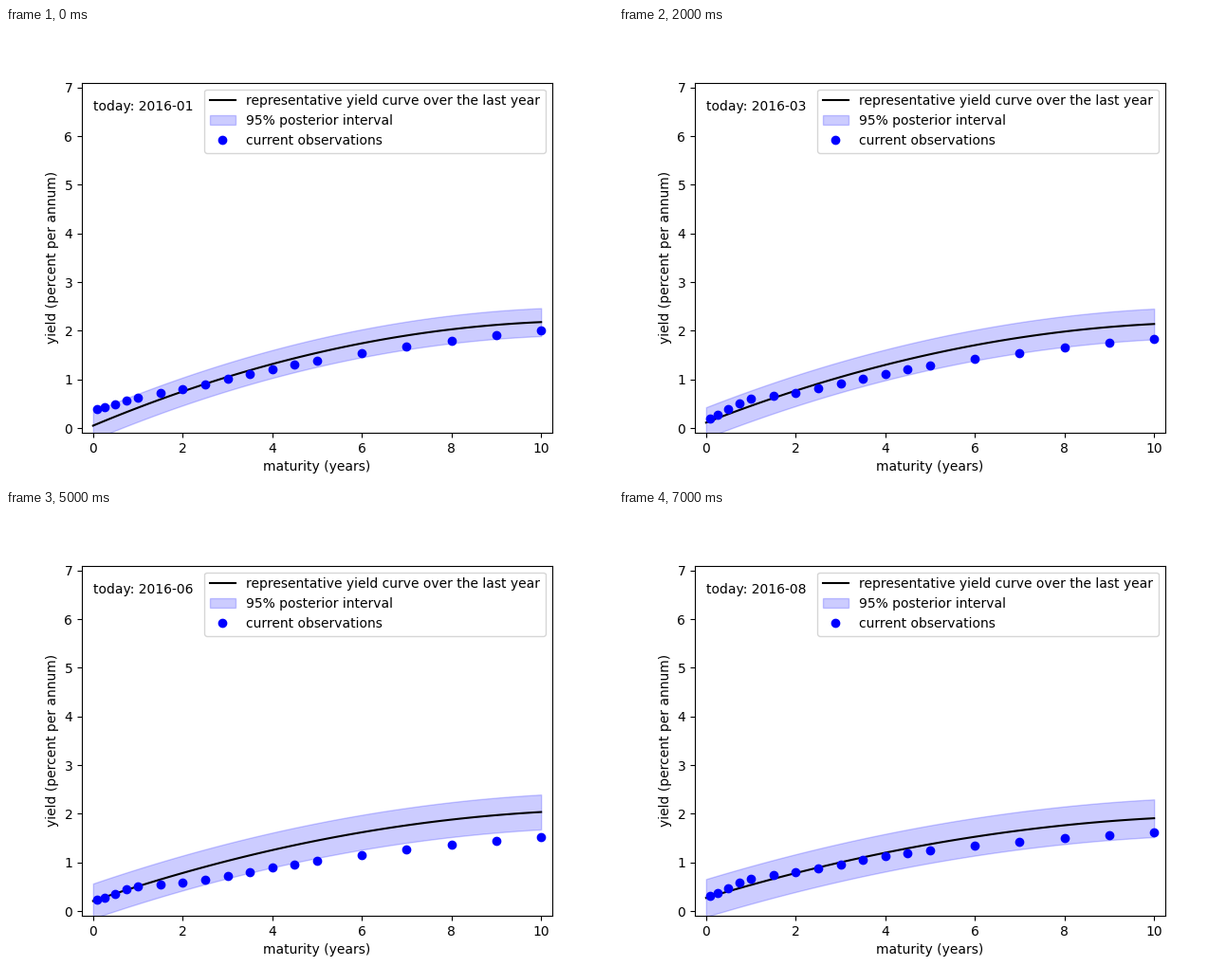
Write a matplotlib script that moves like this. It is 640 px wide and 480 px high and loops after 8 s.

```python
import numpy as np
import matplotlib.pyplot as plt
from matplotlib.animation import FuncAnimation

MONTHS = 8
MATURITIES = np.r_[1 / 12, 0.25:1:0.25, 1:5:0.5, 5:11]

# Observed yields at 1 month, 1, 2.5, 5 and 10 years, one row per month
KEY_YIELDS = [
    (0.39, 0.62, 0.90, 1.38, 2.00),
    (0.29, 0.68, 0.82, 1.29, 1.83),
    (0.19, 0.60, 0.81, 1.28, 1.83),
    (0.21, 0.59, 0.86, 1.35, 1.89),
    (0.31, 0.72, 0.95, 1.42, 1.91),
    (0.23, 0.51, 0.64, 1.03, 1.52),
    (0.20, 0.54, 0.71, 1.05, 1.49),
    (0.31, 0.66, 0.88, 1.25, 1.62),
]
KEY_MATURITIES = np.array([1 / 12, 0.5, 1, 2.5, 5, 10])

x = np.linspace(0, 10, 101)


def hermite(u, knots, values):
    """Smooth cubic interpolation through the knots."""
    slopes = np.gradient(values, knots)
    i = np.clip(np.searchsorted(knots, u) - 1, 0, len(knots) - 2)
    width = knots[i + 1] - knots[i]
    s = (u - knots[i]) / width
    ease = s * s * (3 - 2 * s)
    bend = s * (1 - s) * ((1 - s) * slopes[i] - s * slopes[i + 1])
    return values[i] + (values[i + 1] - values[i]) * ease + width * bend


def observations(month):
    first, one_year, *rest = KEY_YIELDS[month]
    half_year = (first + one_year) / 2 - 0.01
    values = np.array([first, half_year, one_year, *rest])
    return hermite(np.log(MATURITIES), np.log(KEY_MATURITIES), values)


def yield_curve(month):
    """Parabola that flattens month by month, with its half width."""
    short = 0.05 + 0.0315 * month
    long = np.interp(month, [0, 4, 7], [2.178, 2.10, 1.908])
    curvature = 0.0173 - 0.00084 * month
    mean = short + (long - short) * x / 10 + curvature * x * (10 - x)
    return mean, 0.287 + 0.0143 * month


fig, ax = plt.subplots(figsize=(6.4, 4.8), dpi=100)
ax.set(xlim=(-0.25, 10.25), ylim=(-0.1, 7.1),
       xlabel="maturity (years)", ylabel="yield (percent per annum)")

mean, half = yield_curve(0)
line, = ax.plot(x, mean, "k", label="representative yield curve over the last year")
band = ax.fill_between(x, mean - half, mean + half, color="b", alpha=0.2,
                       label="95% posterior interval")
dots, = ax.plot(MATURITIES, observations(0), "bo", label="current observations")
today = ax.text(0, 6.52, "")
ax.legend(handles=[line, band, dots], loc="upper right")


def update(month):
    mean, half = yield_curve(month)
    line.set_ydata(mean)
    outline = np.column_stack([np.r_[x, x[::-1]],
                               np.r_[mean - half, (mean + half)[::-1]]])
    band.set_verts([outline])
    dots.set_ydata(observations(month))
    today.set_text(f"today: 2016-{month + 1:02d}")
    return line, band, dots, today


anim = FuncAnimation(fig, update, frames=MONTHS, interval=1000, repeat=True)
plt.show()
```
